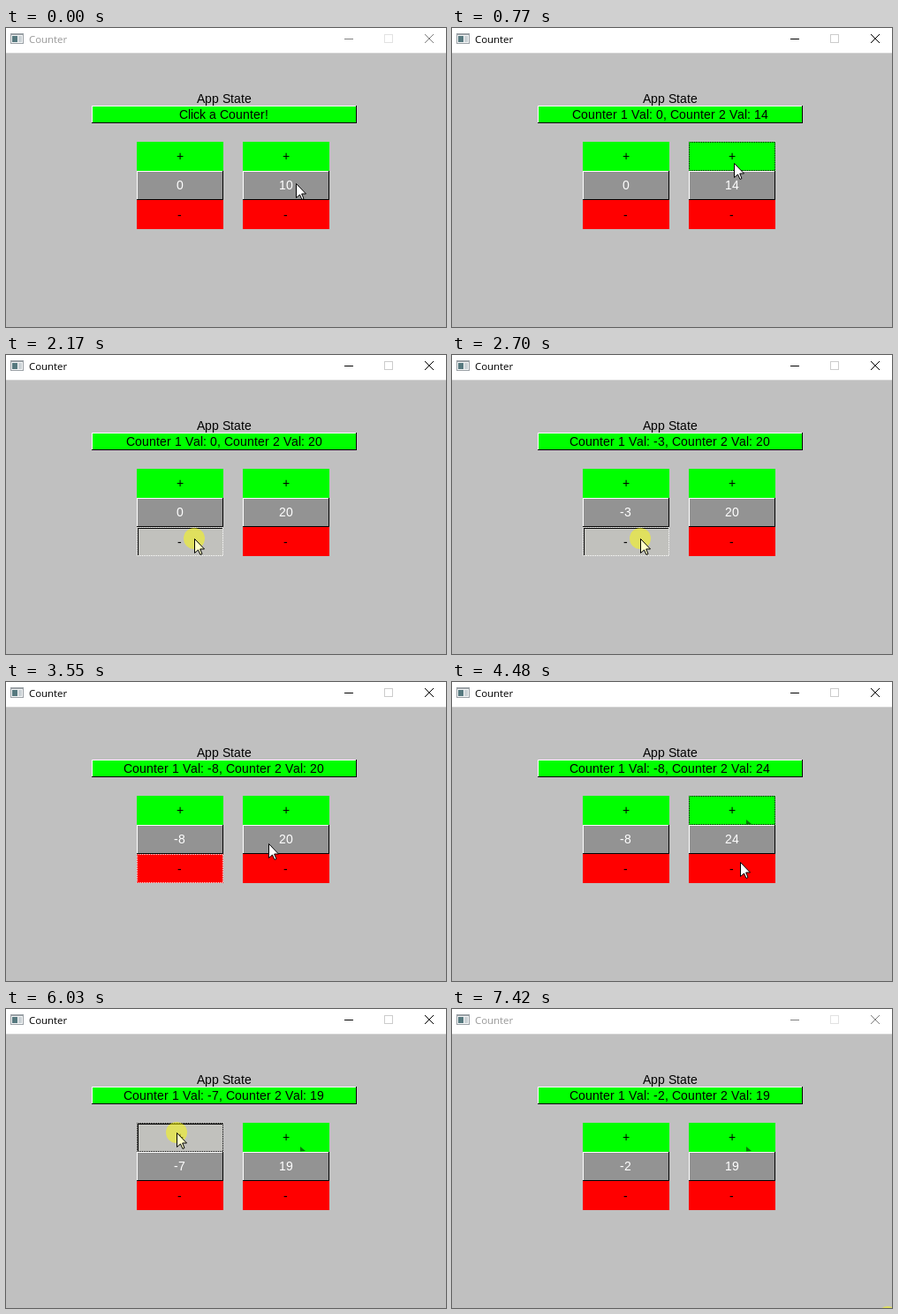
These frames come from a looping animation (498x339 px, 7.57 s). An HTML page with a canvas:

```html
<!DOCTYPE html>
<html lang="en">
<head>
<meta charset="utf-8">
<title>Counter</title>
<style>
  html, body { margin: 0; width: 100%; height: 100%; overflow: hidden; background: #c0c0c0; }
  canvas { display: block; }
</style>
</head>
<body>
<canvas id="stage" width="498" height="339"></canvas>
<script>
const ctx = document.getElementById('stage').getContext('2d');
ctx.fontKerning = 'none';

const LOOP = 7570, ACTIVATE = 230, DEACTIVATE = 7420;
const HOLD = 85; // how long a quick click stays down
const UI = '14px "Liberation Sans", Arial, sans-serif';
const TITLE = '11.4px "Open Sans", "Noto Sans", sans-serif';

// Two columns, each with a plus above and a minus below its value.
const buttons = [148, 268].flatMap((x, counter) => [
  { x, counter, y: 129, base: 150, label: '+', step: 1, color: '#0f0', focus: '#000' },
  { x, counter, y: 195, base: 217, label: '-', step: -1, color: '#f00', focus: '#fff' },
]);

// Bursts of evenly spaced clicks; press and release belong to the first click.
const bursts = [
  { button: 2, press: 230, release: 300, period: 156, count: 6 },
  { button: 2, press: 1170, release: 1250, period: 205, count: 4 },
  { button: 1, press: 2170, release: 2320, period: 154, count: 8 },
  { button: 2, press: 3710, release: 3780, period: 156, count: 4 },
  { button: 3, press: 4560, release: 4630, period: 102, count: 5 },
  { button: 0, press: 5720, release: 5870, period: 155, count: 1 },
  { button: 0, press: 6030, release: 6260, period: 155, count: 5 },
];

// Places where the pointer rests; it glides straight from one to the next.
const stops = [
  { x: 328, y: 176, arrive: 0, leave: 10 },
  { x: 319, y: 153, arrive: 230, leave: 1870 },
  { x: 213, y: 208, arrive: 2090, leave: 3480 },
  { x: 297, y: 183, arrive: 3550, leave: 3600 },
  { x: 327, y: 146, arrive: 3710, leave: 4260 },
  { x: 326, y: 204, arrive: 4480, leave: 5050 },
  { x: 222, y: 172, arrive: 5270, leave: 5350 },
  { x: 217, y: 139, arrive: 5490, leave: 5650 },
  { x: 193, y: 140, arrive: 5720, leave: 6890 },
  { x: 368, y: 212, arrive: 6960, leave: LOOP },
];

function stateAt(t) {
  const s = { values: [0, 10], focus: -1, pressed: -1, active: t >= ACTIVATE && t < DEACTIVATE };
  for (const { button, press, release, period, count } of bursts) {
    if (t < press) break;
    s.focus = button;
    for (let i = 0; i < count; i++) {
      const up = release + i * period;
      if (t >= up) s.values[buttons[button].counter] += buttons[button].step;
      else if (t >= (i ? up - HOLD : press)) s.pressed = button;
    }
  }
  if (!s.active) s.focus = -1;
  return s;
}

function pointerAt(t) {
  const i = stops.findLastIndex(p => p.arrive <= t);
  const from = stops[i], to = stops[i + 1] || from;
  const k = t <= from.leave ? 0 : (t - from.leave) / (to.arrive - from.leave);
  return [Math.round(from.x + (to.x - from.x) * k), Math.round(from.y + (to.y - from.y) * k)];
}

function rect(x, y, w, h, color) {
  ctx.fillStyle = color;
  ctx.fillRect(x, y, w, h);
}

// Centred text whose letters advance by whole pixels.
function text(str, center, y, color = '#000') {
  ctx.font = UI;
  ctx.fillStyle = color;
  const chars = [...String(str)];
  const widths = chars.map(c => Math.round(ctx.measureText(c).width));
  let x = Math.floor(center - widths.reduce((a, b) => a + b) / 2);
  chars.forEach((c, i) => {
    ctx.fillText(c, x, y);
    x += widths[i];
  });
}

function stroke(color, ...lines) {
  ctx.strokeStyle = color;
  ctx.beginPath();
  for (const [x1, y1, x2, y2] of lines) {
    ctx.moveTo(x1, y1);
    ctx.lineTo(x2, y2);
  }
  ctx.stroke();
}

function polygon(points, fill) {
  ctx.beginPath();
  for (const [x, y] of points) ctx.lineTo(x, y);
  ctx.closePath();
  ctx.fillStyle = fill;
  ctx.fill();
}

function raised(x, y, w, h, color) {
  rect(x, y, w, h, '#000');
  rect(x, y, w - 1, h - 1, '#fff');
  rect(x + 1, y + 1, w - 2, h - 2, color);
}

function dotted(x, y, w, h, color) {
  ctx.setLineDash([1, 1]);
  ctx.lineDashOffset = .5; // keeps dots on whole pixels
  ctx.strokeStyle = color;
  ctx.strokeRect(x + .5, y + .5, w - 1, h - 1);
  ctx.setLineDash([]);
}

function halo(x, y) {
  ctx.beginPath();
  ctx.arc(x, y, 12, 0, 7);
  ctx.fillStyle = 'rgba(255,255,0,.5)';
  ctx.fill();
}

function drawTitleBar(active) {
  const ink = active ? '#000' : '#808080';
  rect(0, 0, 498, 28, '#fff');
  rect(0, 28, 498, 1, '#d4d4d4');
  rect(5, 6, 15, 12, '#9aa0a5');
  rect(6, 8, 13, 9, '#f4f6f7');
  rect(7, 9, 6, 7, '#56797f');
  rect(14, 9, 4, 7, '#cbd2d6');
  ctx.font = TITLE;
  ctx.fillStyle = active ? '#000' : '#999';
  ctx.fillText('Counter', 26, 17);
  stroke(ink, [383, 12.5, 393, 12.5], [474, 7, 484, 17], [484, 7, 474, 17]);
  ctx.strokeStyle = active ? '#ccc' : '#e2e2e2';
  ctx.strokeRect(428.5, 7.5, 9, 9);
}

function drawButton({ x, y, base, label, color, focus }, pressed, focused) {
  const w = 98, h = 33;
  rect(x, y, w, h, pressed ? '#c1c1bd' : color);
  if (pressed) {
    stroke('#000', [x + 1, y + 1.5, x + w - 1, y + 1.5], [x + 1.5, y + 1, x + 1.5, y + h - 1]);
  }
  if (focused) dotted(x, y, w, h, focus);
  text(label, x + w / 2, base);
}

function drawPointer(x, y, pressed) {
  const shape = [[0, 0], [0, 16], [4, 12.5], [6.5, 18], [8.5, 17], [6.2, 11.5], [11, 11.5]];
  polygon(shape.map(([dx, dy]) => [x + dx + .5, y + dy + .5]), pressed ? '#ffffc8' : '#fff');
  ctx.strokeStyle = '#000';
  ctx.stroke();
}

function draw(t) {
  const s = stateAt(t), [a, b] = s.values;
  const clicked = t >= bursts[0].release;
  rect(0, 0, 498, 339, '#c0c0c0');
  drawTitleBar(s.active);

  text('App State', 247, 85);
  raised(97, 88, 300, 20, '#0f0');
  text(clicked ? `Counter 1 Val: ${a}, Counter 2 Val: ${b}` : 'Click a Counter!', 247, 103);

  buttons.forEach((btn, i) => drawButton(btn, i === s.pressed, i === s.focus));
  s.values.forEach((v, i) => {
    const x = 148 + 120 * i;
    raised(x, 162, 98, 33, '#939393');
    text(v, x + 49, 183, '#fff');
  });

  // Speck left behind on the second plus button.
  if (t >= 4330) polygon([[333, 156], [339, 161], [333, 161.5]], '#087808');

  if (t >= DEACTIVATE) {
    halo(493, 349);
  } else {
    const [x, y] = pointerAt(t), pressed = s.pressed >= 0;
    if (pressed) halo(x, y);
    drawPointer(x, y, pressed);
  }
}

const start = performance.now();
function tick() {
  draw((performance.now() - start) % LOOP);
  requestAnimationFrame(tick);
}
tick();
</script>
</body>
</html>
```
